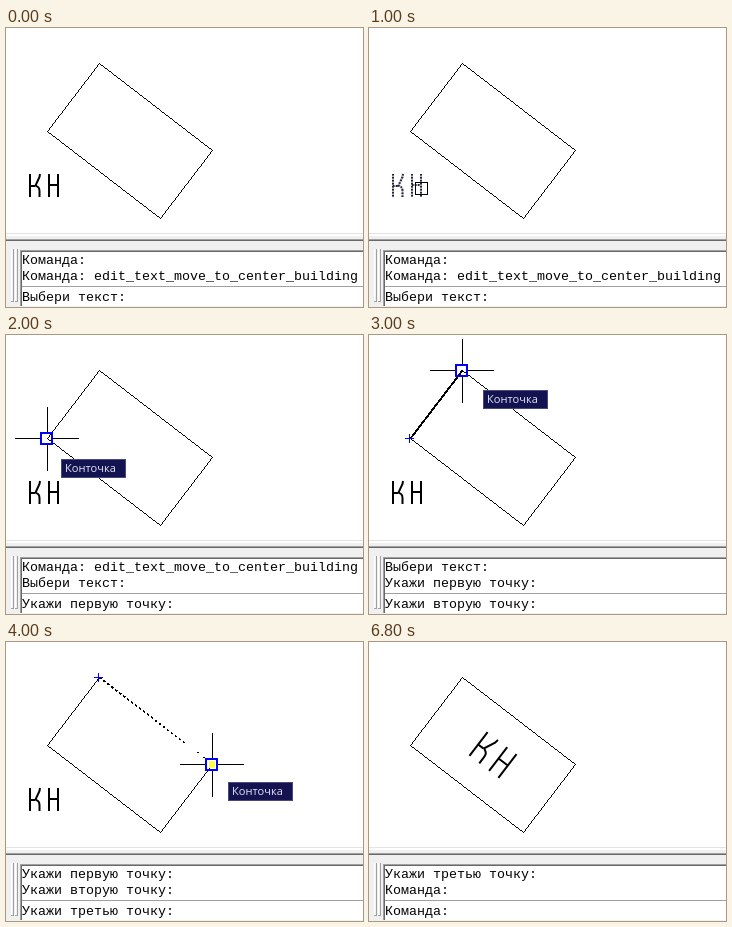
An HTML page for the animation above (8000 ms loop, 357x279 px).

```html
<!DOCTYPE html>
<html lang="ru">
<head>
<meta charset="utf-8">
<style>
  html, body { margin: 0; width: 100%; height: 100%; overflow: hidden; background: #fff; }
  svg { display: block; width: 357px; height: 279px; }
  .log { font: 13.333px "Liberation Mono", monospace; white-space: pre; }
  .tip text { font: 11.1px "Open Sans", sans-serif; fill: #e4e4f2; }
  .line { fill: none; stroke: #000; shape-rendering: crispEdges; }
  .label { fill: none; stroke: #000; stroke-width: 2; }
  .label path, #label { vector-effect: non-scaling-stroke; }
  .blue { fill: none; stroke: #00f; shape-rendering: crispEdges; }
  .panel { shape-rendering: crispEdges; }
</style>
</head>
<body>
<svg viewBox="0 0 357 279">
  <defs>
    <path id="label" d="M24 146V169M24 158H29M34 146L33.5 149L29.5 157.5L32 159Q33.5 160 33.5 163V169M43 146V169M52 146V169M43 157H52"/>
    <g id="cursor">
      <path class="line" d="M-32 .5H-6M6 .5H32M.5 -31V-5M.5 6V33"/>
      <rect class="blue" x="-6" y="-5" width="11" height="11" stroke-width="2"/>
    </g>
    <g id="tip" class="tip">
      <rect class="panel" x="14" y="20" width="65" height="19" fill="#48487c"/>
      <rect class="panel" x="15" y="21" width="63" height="17" fill="#131352"/>
      <text x="18" y="33">Конточка</text>
    </g>
    <path id="point" class="blue" d="M-4 .5H5M.5 -4V5"/>
  </defs>

  <path data-line="93 35 41 103"/>
  <path data-line="41 103 154 190"/>
  <path data-line="154 190 206 122"/>
  <path data-line="93 35 206 122" data-steps="0 1 2 3 5"/>

  <use class="label" data-steps="0 2 3 4" href="#label"/>

  <g data-steps="1">
    <use class="label" href="#label" style="stroke:#b4b4c0"/>
    <use class="label" href="#label" style="stroke:#282038" stroke-dasharray="1.5 1.5"/>
    <rect class="line" x="46.5" y="154.5" width="12" height="12"/>
  </g>

  <g data-steps="2">
    <use href="#cursor" x="41" y="103"/>
    <use href="#tip" x="41" y="104"/>
  </g>

  <g data-steps="3">
    <path class="line" stroke-width="2" d="M41.5 103.5L93.5 35.5"/>
    <use href="#point" x="40" y="103"/>
    <use href="#cursor" x="93" y="35"/>
    <use href="#tip" x="100" y="35"/>
  </g>

  <g data-steps="4">
    <path class="line" stroke-width="1.6" stroke-dasharray="2.5 2.5" d="M93.5 35.5L180 102"/>
    <path class="line" d="M191 110.5h1.5M197 115.5h1.5"/>
    <use href="#point" x="92" y="35"/>
    <rect class="panel" x="203" y="119" width="6" height="7" fill="#ff4"/>
    <use href="#cursor" x="206" y="122"/>
    <use href="#tip" x="208" y="120"/>
  </g>

  <use class="label" data-steps="5" href="#label" transform="translate(124 113) rotate(37.4) scale(1.3) translate(-38 -157.5)"/>

  <g class="panel">
    <path fill="#f0f0f0" d="M0 205H357V279H0z"/>
    <path fill="#e3e3e3" d="M0 205H357V206H0z"/>
    <path fill="#fff" d="M0 206H357V208H0z"/>
    <path fill="#a0a0a0" d="M0 211H357V212H0z"/>
    <path fill="#696969" d="M0 212H357V213H0z"/>
    <path fill="#a0a0a0" d="M14 222H357V278H14z"/>
    <path fill="#696969" d="M15 223H357V278H15z"/>
    <path fill="#fff" d="M16 224H357V278H16z"/>
    <path fill="#a0a0a0" d="M16 258H357V259H16z"/>
    <path fill="#fff" d="M5 221h1V274h-1zM9 221h1V274h-1z"/>
    <path fill="#a0a0a0" d="M7 221h1V274h-3v-1h2zM11 221h1V274h-3v-1h2z"/>
  </g>
  <g class="log">
    <text x="16" y="236"></text>
    <text x="16" y="252"></text>
    <text x="16" y="273"></text>
  </g>
</svg>
<script>
const LOOP = 8000;
const STARTS = [0, 1000, 2000, 3000, 4000, 5000];
const FIRST_LINE = [0, 0, 1, 2, 3, 5];
const LOG = [
  "Команда:",
  "Команда: edit_text_move_to_center_building",
  "Выбери текст:",
  "Укажи первую точку:",
  "Укажи вторую точку:",
  "Укажи третью точку:",
  "Команда:",
  "Команда:"
];
const parts = [...document.querySelectorAll("[data-steps]")].map(el =>
  ({ el, steps: el.dataset.steps.split(" ").map(Number) }));
const rows = document.querySelectorAll(".log text");
let shown = -1;

// Aliased line, one pixel per step along its longer axis.
function pixelLine(x0, y0, x1, y1) {
  const n = Math.max(Math.abs(x1 - x0), Math.abs(y1 - y0));
  let d = "";
  for (let i = 0; i <= n; i++) {
    const x = Math.round(x0 + (x1 - x0) * i / n);
    const y = Math.round(y0 + (y1 - y0) * i / n);
    d += `M${x} ${y}h1v1h-1z`;
  }
  return d;
}

function show(step) {
  for (const { el, steps } of parts) el.style.display = steps.includes(step) ? "" : "none";
  rows.forEach((row, i) => row.textContent = LOG[FIRST_LINE[step] + i]);
}

function tick() {
  const t = performance.now() % LOOP;
  const step = STARTS.findLastIndex(start => t >= start);
  if (step !== shown) show(shown = step);
  requestAnimationFrame(tick);
}

for (const el of document.querySelectorAll("[data-line]")) {
  el.setAttribute("d", pixelLine(...el.dataset.line.split(" ").map(Number)));
  el.setAttribute("shape-rendering", "crispEdges");
}
tick();
</script>
</body>
</html>
```
